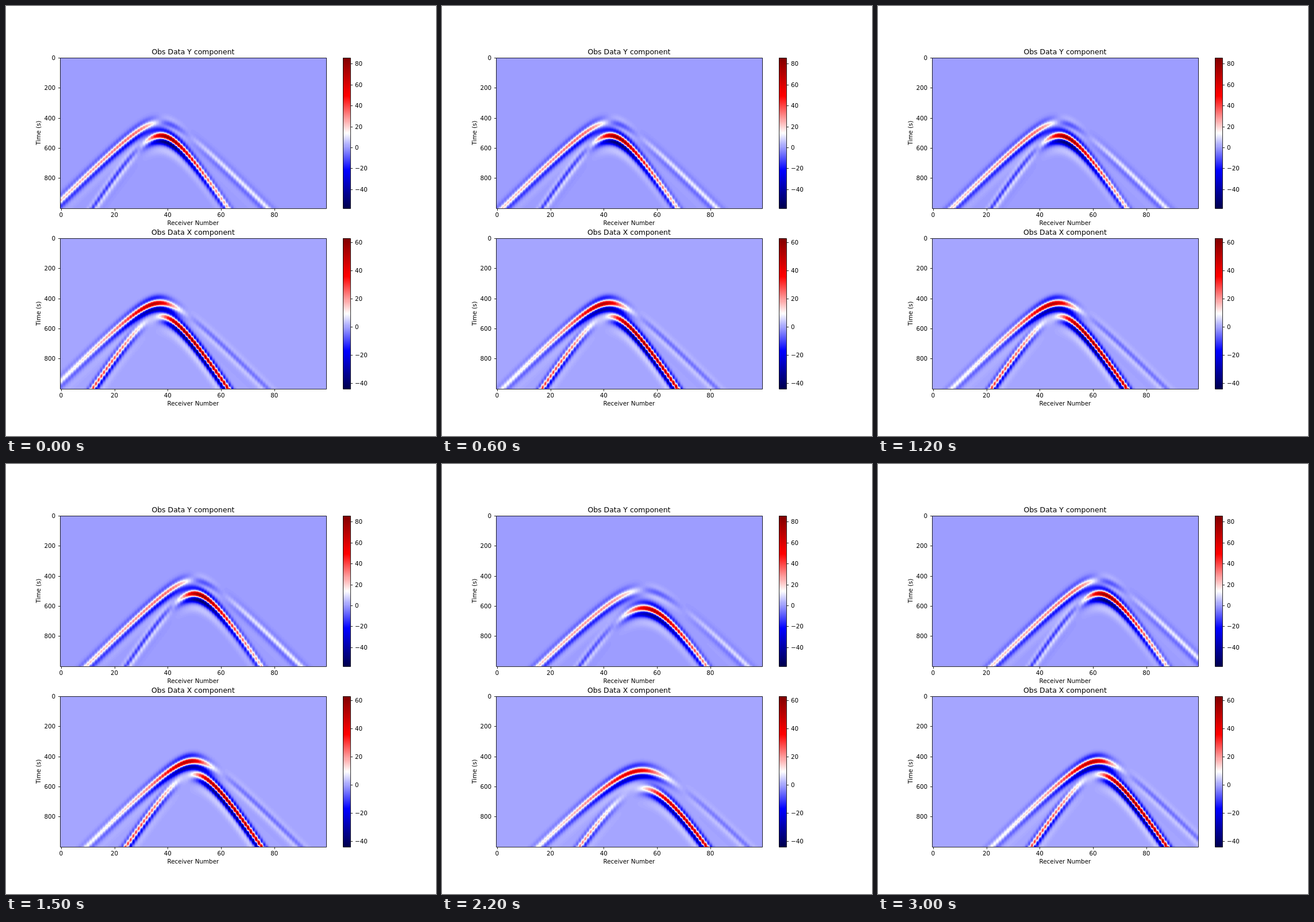
Recreate the animation shown at these times as an HTML page with a canvas. Size 748x748 px, loop 3100 ms.

```html
<!DOCTYPE html>
<html lang="en">
<head>
<meta charset="utf-8">
<title>Observed data</title>
<style>
  html, body { margin: 0; width: 100%; height: 100%; overflow: hidden; background: #fff; }
  canvas, svg { position: absolute; left: 0; top: 0; display: block; }
  text { font-family: "DejaVu Sans", sans-serif; font-size: 10.39px; fill: #000; }
  .title { font-size: 12.47px; }
  .mid { text-anchor: middle; }
  .end { text-anchor: end; }
  path { fill: none; stroke: #000; stroke-width: .83; }
</style>
</head>
<body>
<canvas id="view" width="748" height="748"></canvas>
<svg id="axes" width="748" height="748" viewBox="0 0 748 748"></svg>
<script>
const ctx = document.getElementById('view').getContext('2d');
const axes = document.getElementById('axes');

const LEFT = 93.5, WIDTH = 463.8, HEIGHT = 261.8;
const BAR = 586.2, BAR_W = 13.1;
const RECEIVERS = 100, SAMPLES = 1000;
const COL = WIDTH / RECEIVERS, ROW = HEIGHT / SAMPLES;
const IMG_W = 464, IMG_H = 262;
const STEP = 100, STEPS = 31;

const panels = [
  { name: 'Y', top: 89.76, min: -58.1, max: 85.9, ticks: [80, 60, 40, 20, 0, -20, -40] },
  { name: 'X', top: 403.92, min: -44.1, max: 62.9, ticks: [60, 40, 20, 0, -20, -40] }
];

// Diverging colour map: navy, blue, white, red, maroon
const stops = [[0, 0, 76.5], [0, 0, 255], [255, 255, 255], [255, 0, 0], [127.5, 0, 0]];
const palette = Array.from({ length: 256 }, (_, k) => {
  const p = k / 255 * 4, s = Math.min(3, Math.floor(p)), f = p - s;
  const [r, g, b] = stops[s].map((c, j) => Math.round(c + (stops[s + 1][j] - c) * f));
  return (255 << 24 | b << 16 | g << 8 | r) >>> 0;
});

// ---- static axes ----
const snap = v => Math.round(v) + .5;
let markup = '';
const line = d => { markup += `<path d="${d}"/>`; };
const label = (x, y, s, cls = '', extra = '') => {
  markup += `<text x="${x}" y="${Math.round(y)}" class="${cls}" ${extra}>${s}</text>`;
};
const box = (x, y, w, h) =>
  line(`M${snap(x)} ${snap(y)}H${snap(x + w)}V${snap(y + h)}H${snap(x)}Z`);

for (const p of panels) {
  const base = p.top + HEIGHT, mid = LEFT + WIDTH / 2, yMid = p.top + HEIGHT / 2;
  box(LEFT, p.top, WIDTH, HEIGHT);
  box(BAR, p.top, BAR_W, HEIGHT);
  for (let n = 0; n < RECEIVERS; n += 20) {
    const x = LEFT + (n + .5) * COL;
    line(`M${snap(x)} ${snap(base)}v3.64`);
    label(x, base + 15.2, n, 'mid');
  }
  for (let t = 0; t < SAMPLES; t += 200) {
    const y = p.top + (t + .5) * ROW;
    line(`M${snap(LEFT)} ${snap(y)}h-3.64`);
    label(LEFT - 7.3, y + 3.95, t, 'end');
  }
  for (const v of p.ticks) {
    const y = p.top + (p.max - v) / (p.max - p.min) * HEIGHT;
    line(`M${snap(BAR + BAR_W)} ${snap(y)}h3.64`);
    label(607, y + 3.95, String(v).replace('-', '\u2212'));
  }
  label(mid, p.top - 6.2, `Obs Data ${p.name} component`, 'title mid');
  label(mid, base + 29.5, 'Receiver Number', 'mid');
  label(0, 0, 'Time (s)', 'mid', `transform="translate(60 ${yMid}) rotate(-90)"`);
}
axes.innerHTML = markup;

// ---- wavefield ----
const DELAY = 266, SLOW_P = 17.73, SLOW_S = 27.1, SIGMA = 22;
const FORCE = 40 * Math.PI / 180;
const SHALLOW = 9.25, DEEP = 12.8;

function wavelet(tau) {
  const u = tau / SIGMA - .15;
  if (u < -5 || u > 9) return 0;
  return (1 - u * u - .45 * u) * Math.exp(-u * u / 2)
    + .07 * Math.exp(-(((u - 4.2) / 1.5) ** 2));
}

// Direct P and S arrivals of a tilted point force, recorded at one receiver
function arrivals(dx, depth) {
  const r = Math.hypot(dx, depth), a = Math.atan2(dx, depth);
  const spread = Math.sqrt(9.15 / r);
  const sin = Math.sin(a), cos = Math.cos(a);
  const p = 58 * spread * Math.cos(a + FORCE);
  const s = 104 * spread * Math.sin(a + FORCE);
  return {
    tp: DELAY + SLOW_P * r, ts: DELAY + SLOW_S * r,
    p: [-p * sin, p * (.75 * cos + .25)],
    s: [s * (.85 * cos + .15), 45 * spread * (1 - Math.cos(2 * a + FORCE))]
  };
}

const fields = panels.map(() => new Float32Array(RECEIVERS * IMG_H));
const images = panels.map(() => ctx.createImageData(IMG_W, IMG_H));
const pixels = images.map(m => new Uint32Array(m.data.buffer));

const colour = (v, p) => {
  const k = Math.floor((v - p.min) / (p.max - p.min) * 256);
  return palette[Math.max(0, Math.min(255, k))];
};

// Smooth blend between neighbouring receivers for each pixel column
const blend = Array.from({ length: IMG_W }, (_, x) => {
  const n = Math.max(0, Math.min(RECEIVERS - 1, (x + .5) / IMG_W * RECEIVERS - .5));
  const a = Math.floor(n), b = Math.min(RECEIVERS - 1, a + 1);
  return { a: a * IMG_H, b: b * IMG_H, w: .5 - .5 * Math.cos(Math.PI * (n - a)) };
});

function draw(step) {
  // The deep shots sit one position behind the shallow line
  const deep = step >= 22 && step <= 26;
  const source = 37.1 + (deep ? step - 1 : step) * 5 / 6;
  const depth = deep ? DEEP : SHALLOW;
  for (let n = 0; n < RECEIVERS; n++) {
    const q = arrivals(n - source, depth);
    for (let y = 0; y < IMG_H; y++) {
      const t = (y + .5) / IMG_H * SAMPLES;
      const wp = wavelet(t - q.tp), ws = wavelet(t - q.ts);
      fields.forEach((f, c) => { f[n * IMG_H + y] = q.p[c] * wp + q.s[c] * ws; });
    }
  }
  panels.forEach((p, c) => {
    const f = fields[c], out = pixels[c];
    for (let x = 0; x < IMG_W; x++) {
      const { a, b, w } = blend[x];
      for (let y = 0; y < IMG_H; y++) {
        out[y * IMG_W + x] = colour(f[a + y] * (1 - w) + f[b + y] * w, p);
      }
    }
    ctx.putImageData(images[c], 94, Math.round(p.top));
  });
}

function drawBars() {
  for (const p of panels) {
    const bar = ctx.createImageData(13, IMG_H);
    const out = new Uint32Array(bar.data.buffer);
    for (let k = 0; k < out.length; k++) {
      const y = Math.floor(k / 13) + .5;
      out[k] = colour(p.max - y / IMG_H * (p.max - p.min), p);
    }
    ctx.putImageData(bar, 586, Math.round(p.top));
  }
}

let shown = -1;
function tick() {
  const step = Math.floor(performance.now() / STEP) % STEPS;
  if (step !== shown) draw(shown = step);
  requestAnimationFrame(tick);
}
drawBars();
tick();
</script>
</body>
</html>
```
